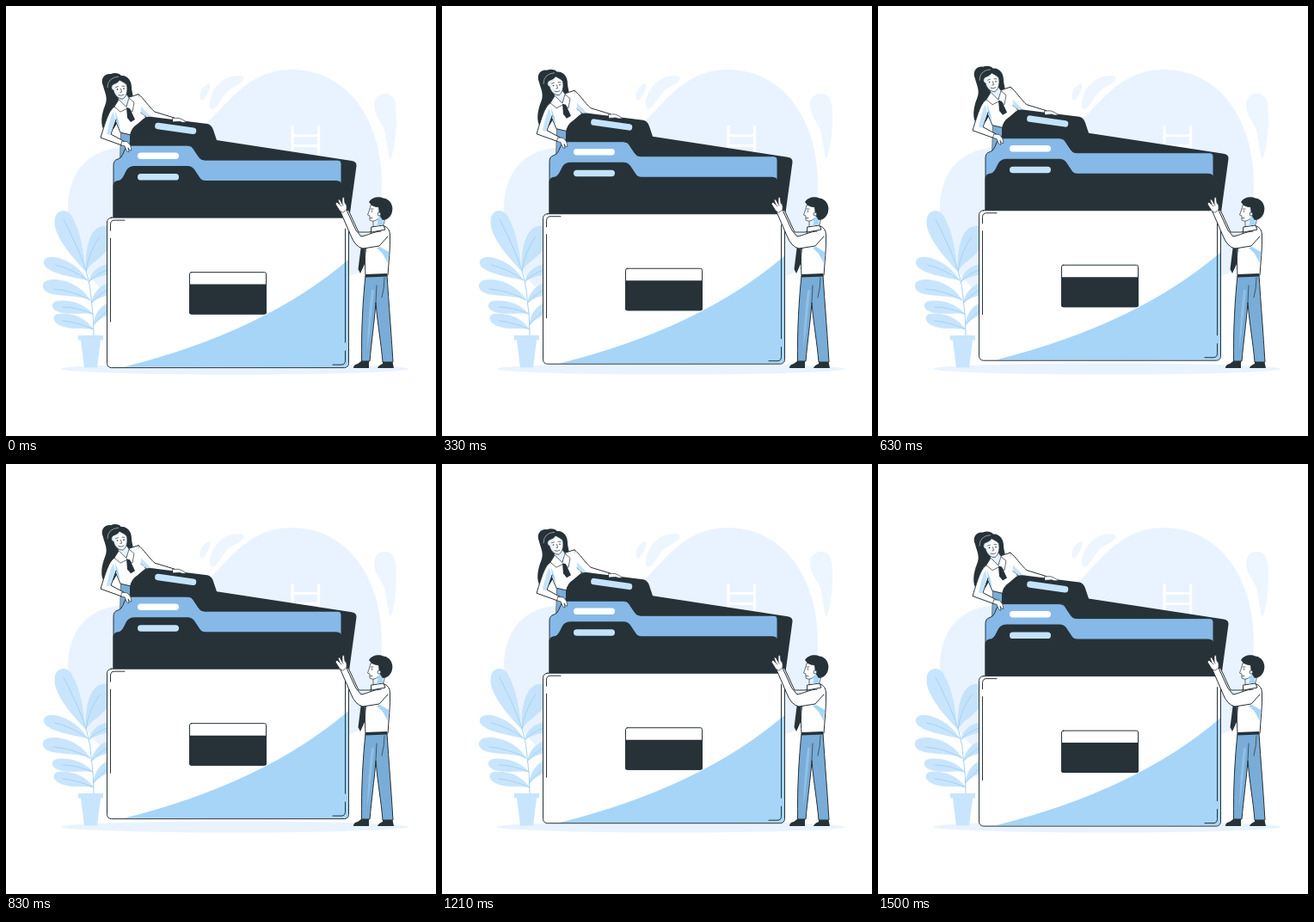
These frames come from a looping animation (500 by 500 pixels, 1.54 s). An HTML page:

```html
<!DOCTYPE html>
<html lang="en">
<head>
<meta charset="utf-8">
<title>Folders</title>
<style>
  html, body { margin: 0; width: 100%; height: 100%; overflow: hidden; background: #fff; }
  svg { display: block; width: 100vw; height: 100vh; }
  .pale { fill: #e9f3ff; }
  .mist { fill: #edf5ff; }
  .leaf { fill: #c8e5fd; }
  .sky { fill: #a6d5f8; }
  .tag { fill: #c4e3fb; }
  .blue { fill: #86b9e7; }
  .denim { fill: #79acd6; }
  .dark { fill: #263238; }
  .white { fill: #fff; }
  .skin { fill: #e8f3ff; }
  .line { stroke: #263238; stroke-width: 1; stroke-linejoin: round; stroke-linecap: round; }
  .thin { stroke-width: .7; }
  .none { fill: none; }
  .vein { fill: none; stroke: #a3d2f7; stroke-width: 1; stroke-linecap: round; }
  .ladder { fill: none; stroke: #fff; stroke-width: 3.2; }
</style>
</head>
<body>
<svg viewBox="0 0 500 500">
  <g id="backdrop">
    <path class="pale" d="M72 236C72 195 94 169 130 165C185 162 212 158 236 134C262 108 285 74 332 74C400 74 437 137 437 205C437 235 431 262 424 285C418 303 410 314 396 314L130 340C92 325 72 275 72 236Z"/>
    <g class="mist">
      <path d="M226 108C224 100 230 92 236 90C239 92 236 100 233 104C231 108 228 112 226 108Z"/>
      <path d="M237 116C236 104 246 86 262 82C272 80 279 82 276 86C273 92 262 94 256 101C250 108 246 118 240 120C238 120 237 118 237 116Z"/>
      <path d="M428 114C429 105 436 101 443 102C452 104 454 112 454 130C454 150 451 170 447 178C444 174 443 155 440 144C436 134 428 128 428 114Z"/>
    </g>
    <path class="ladder" d="M333 139V190M363.500 139V190M333 150.500H363M333 162.500H363"/>
    <ellipse class="pale" cx="266" cy="422" rx="202" ry="6.500"/>
  </g>

  <g id="plant">
    <g class="tag">
      <path d="M93 309C91 285 97 258 112 256C125 254 125 270 118 283C112 293 98 298 93 309Z"/>
      <path d="M96 321C99 308 108 302 120 300V312C111 314 103 316 96 321Z"/>
      <path d="M99 346C101 334 109 324 122 321V336C113 337 106 340 99 346Z"/>
      <path d="M101 372C103 358 109 348 122 344V358C112 362 106 366 101 372Z"/>
    </g>
    <g class="leaf">
      <path d="M92 308C70 285 53 262 57 246C60 236 71 235 77 245C86 262 91 285 92 308Z"/>
      <path d="M95 319C75 315 52 311 45 302C40 293 52 289 64 294C79 299 88 308 95 319Z"/>
      <path d="M98 342C88 337 72 338 54 335C41 332 40 322 48 319C65 315 88 325 98 342Z"/>
      <path d="M101 358C90 356 75 360 62 356C52 353 51 345 59 343C75 341 92 347 101 358Z"/>
      <path d="M102 376C90 374 76 377 64 372C54 368 53 360 60 358C78 356 93 363 102 376Z"/>
    </g>
    <path class="vein" d="M67 248C80 275 97 306 99 340Q102 360 102 383M93 308Q96 286 109 268M95 319Q76 305 57 301M98 342Q78 331 55 329M101 358Q82 350 66 350M102 376Q84 368 66 366M96 321Q105 311 118 307M99 346Q106 337 118 330M101 372Q108 362 118 354"/>
    <path class="leaf" d="M84 383H113V388.500H110L106 420.500H91L87 388.500H84Z"/>
  </g>

  <g id="lift">
    <g id="woman" transform="translate(0 .6)">
      <path class="denim line thin" d="M134 144L149 148L147 178H133Z"/>
      <path class="dark" d="M113 93C109 84 115 78 122 79C126 77 132 78 134 81C141 80 146 87 146 94C146 100 149 104 147 112L128 138C124 146 119 150 115 146C109 139 111 126 115 116C119 107 115 101 113 93Z"/>
      <path class="white line" d="M126 117L134 109L154 102.500L159 119L163 132L148 146L146 150L133 147L125 128Z"/>
      <path class="sky" d="M126 120L131 134L133 146L126 129Z"/>
      <path class="white line" d="M154 102.500C160 107 166 117 173 123L196 130L194 136L167 131L157 124"/>
      <path class="tag" d="M157 117L168 128L189 133L189 135L166 131L157 124Z"/>
      <path class="white line" d="M126 117C120 121 117 130 110 153L135 162L137 157L122 149L128 132"/>
      <path class="tag" d="M125 123C121 129 119 140 117 149L121 150L127 132Z"/>
      <path class="skin line thin" d="M130 104L131 113L140 117L144 108L139 101Z"/>
      <path class="skin line thin" d="M124.500 91C128 90 131 88 132 86C135 88 139 89 140.500 92C142 99 140 105 136 108C130 108 126 103 125 98C122 97 122 93 124.500 91Z"/>
      <path class="white" d="M127 93Q132 91 133 88Q138 90 139.500 93Q140.500 101 136 106Q129 104 127 93Z"/>
      <path class="none line thin" d="M127.500 94.500L130.500 93.500M135 93L138 93.200M133.500 96L134.500 100L132.800 100.300M131 103.500Q134 105 137 103"/>
      <circle class="dark" cx="129.500" cy="96.800" r=".8"/>
      <circle class="dark" cx="137" cy="96" r=".8"/>
      <path class="none" stroke="#fff" stroke-width=".5" d="M131 82Q118 83 118 95"/>
      <path class="white line thin" d="M131 109L126 117L133 123L141 119L147 123L149 112L143 107L140 117Z"/>
      <path class="dark" d="M140 118L144 119L150 132L145 135L141 130Z"/>
    </g>

    <g id="folders" transform="translate(0 .6)">
      <path class="dark" d="M136 248V180L144 158V151Q145 142 153 137L160 131Q163 128 170 129L234 137Q239 138 241 144L245 156L402 180Q408 181 407.500 186L399 248H136Z"/>
      <rect class="tag" x="173" y="138.500" width="48.500" height="7.500" rx="3.700" transform="rotate(8 197 142)"/>
      <path class="blue line" d="M125 247V185Q125 179 130 178Q134 177 136 172L138 167Q140 162 147 162H211Q216 162 218 166L224 175Q226 179 231 179H386Q390 179 390 183V247Z"/>
      <rect class="white" x="153" y="170.300" width="48" height="7.500" rx="3.700"/>
      <path class="dark" d="M124.500 247V209Q124.500 204 130 203Q134 203 137 197L140 191Q143 186 150 186H211Q216 186 219 190L225 199Q227 203 232 203H384Q390.500 203 390.500 209V247Z"/>
      <rect class="tag" x="153" y="195" width="48" height="7.500" rx="3.700"/>
      <rect class="white" x="117.500" y="246" width="281" height="174.500" rx="5"/>
      <path class="sky" d="M137 419.700Q300 379 398 295V415Q398 420 393 420Z"/>
      <rect class="none line" x="117.500" y="246" width="281" height="174.500" rx="5"/>
      <path class="none line" d="M121.500 261V254Q121.500 249 126 249H138M121.500 270V367M394.500 259V391M394.500 401V412Q394.500 417 390 417H380"/>
      <rect class="white line" x="213.500" y="309.500" width="89" height="48.500" rx="2"/>
      <path class="dark" d="M213 323.500H303V356Q303 358.500 300 358.500H216Q213 358.500 213 356Z"/>
    </g>

    <g id="grip" class="white line thin" transform="translate(0 .3)">
      <path d="M194 130.500L201 130.500Q206 132 210 135.500L205 135.500L202 134.500L194 135Z"/>
      <path d="M135 157.500L141 158Q146 162 146 168L144 168L142 165L143 170L140.500 169L138 163L134 162Z"/>
    </g>
  </g>

  <g id="man">
    <path class="white line" d="M431 261L422 263L410 263L398 237L392 240L404 263Q408 268 413 268L428 272Z"/>
    <path class="tag" d="M396 242L407 264L422 266L425 269L411 266L404 261Z"/>
    <path class="denim line" d="M418 314L443 313C445 345 448 380 450 414H438C436 390 432 370 430 345C428 370 425 390 423 413H413.500C413 380 415 340 418 314Z"/>
    <path class="none line thin" d="M430 345L431 325M440 316Q440 328 437 339"/>
    <path class="sky" opacity=".5" d="M425 330L428 330L423 380L420 400Q421 360 425 330Z"/>
    <path class="dark" d="M413 413H422V421H404Q404 417 409 416ZM438 414H449.500L451 421H432Q433 418 438 416Z"/>
    <path class="white line" d="M426 259L440 256Q446 258 446.500 266C447 282 445 297 444 313L418 313C417 298 417 285 420 277Z"/>
    <path class="sky" d="M445 286L435 280L431 281L438 288L444 299Z"/>
    <path class="dark" d="M418 312L443 311V314.500L418 315.500ZM413 278L418 277L417 300L412 311L409.500 306Z"/>
    <path class="skin line thin" d="M427 246L427 257L438 258L441 246L435 240Z"/>
    <path class="white line" d="M425 257L439 255L441 260L425 263Z"/>
    <path class="white line thin" d="M424 232C423 236 422 239 420.500 243L423 244L423 249Q428 252 433 247L437 244L437 233Z"/>
    <path class="sky" d="M434 245L438 244L438 254L431 256Q433 252 432 248Z"/>
    <path class="dark" d="M422 228C425 222 434 221 439 223.500C446 224 451 232 449 239C448 245 443 249 438 249L434 243L433 234Q426 234 422 228Z"/>
    <circle class="skin line thin" cx="434" cy="242" r="2"/>
    <path class="none line thin" d="M424 236L427 236M425.500 238V239.500M423.500 246.500H426"/>
    <path class="white line" d="M436 262C428 262 420 267 413 268L407 261L395 235L388 237L401 267Q406 280 415 282L434 279L444 268"/>
    <path class="white line thin" d="M388 238L383 230L385 228L388 231L386 225L388 225L391 230L391 223L393 222L394 229Q397 231 396 237L392 240Z"/>
    <path class="none line thin" d="M388 231L390 233M391 230L392 232"/>
  </g>
</svg>
<script>
  const LOOP = 1540;
  const lift = document.getElementById('lift');

  // Steady float: ten units up, then back down to rest.
  function draw(now) {
    const t = now % LOOP;
    const rise = Math.max(0, Math.min(t + 35, 1465 - t) / 75);
    lift.setAttribute('transform', `translate(0 ${-rise})`);
    requestAnimationFrame(draw);
  }
  draw(0);
</script>
</body>
</html>
```
